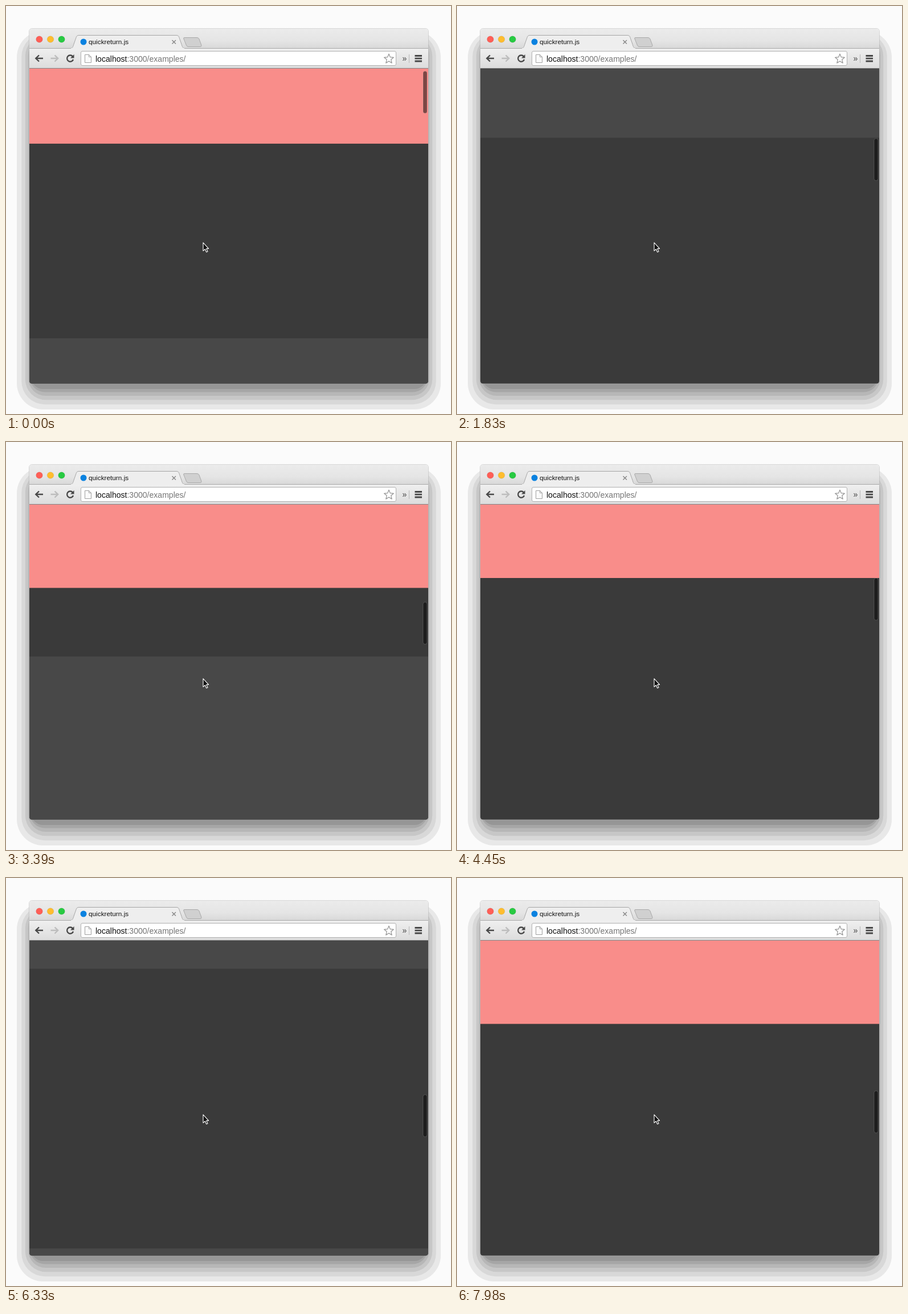
An HTML page that plays this animation: 781 px wide and 717 px high, repeating every 8 s.

```html
<!DOCTYPE html>
<html lang="en">
<head>
<meta charset="utf-8">
<title>Quick return header</title>
<style>
  html, body { margin: 0; width: 100%; height: 100%; overflow: hidden; background: #fbfbfb; }
  svg { display: block; width: 781px; height: 717px; }
  text { font-family: "Liberation Sans", Arial, sans-serif; }
</style>
</head>
<body>
<svg viewBox="0 0 781 717">
  <defs>
    <linearGradient id="strip" x2="0" y2="1">
      <stop offset="0" stop-color="#ebebeb"/><stop offset=".6" stop-color="#e5e5e5"/><stop offset="1" stop-color="#d8d8d8"/>
    </linearGradient>
    <linearGradient id="bar" x2="0" y2="1">
      <stop offset="0" stop-color="#efefef"/><stop offset="1" stop-color="#dcdcdc"/>
    </linearGradient>
    <clipPath id="window"><rect x="41" y="40" width="700" height="623.5" rx="4.5"/></clipPath>
    <clipPath id="page"><rect x="41" y="110" width="700" height="554"/></clipPath>
  </defs>

  <g id="shadow"></g>
  <rect x="40.5" y="39.5" width="701" height="624.5" rx="5" fill="none" stroke="#b5b5b5" stroke-opacity=".5"/>

  <g clip-path="url(#window)">
    <rect x="41" y="40" width="700" height="35" fill="url(#strip)"/>
    <rect x="41" y="75" width="700" height="35" fill="url(#bar)"/>
    <path d="M41 74.5H741" stroke="#a9a9a9"/>
    <path d="M113 74.5C117 74 117.500 72 119 67L123 55.500C124 52.500 125 51.500 128 51.500H299C302 51.500 303 52.500 304 55.500L308 67C309.500 72 310 74 314 74.500" fill="#eee" stroke="#a6a6a6"/>
    <path d="M114 74.500H313" stroke="#eee"/>
    <path d="M313 55.500H335Q338 55.500 339 58L343 69Q343.500 71.500 341 71.500H320Q317.500 71.500 316.500 69L312 58Q311 55.500 313 55.500Z" fill="#d0d0d0" stroke="#a9a9a9"/>

    <g stroke="#000" stroke-opacity=".1" stroke-width=".8">
      <circle cx="58.5" cy="58.5" r="5.8" fill="#ff5f57"/>
      <circle cx="78" cy="58.5" r="5.8" fill="#ffbd2e"/>
      <circle cx="97.5" cy="58.5" r="5.8" fill="#28ca42"/>
    </g>
    <circle cx="136" cy="63" r="5.5" fill="#0a82e0"/>
    <text x="145" y="67" font-size="11.8" fill="#111">quickreturn.js</text>
    <path d="M291.5 60L298 66.5M298 60L291.5 66.5" stroke="#858585" stroke-width="1.4"/>

    <g fill="none" stroke="#484848" stroke-width="2.4">
      <path d="M65 92H53M58 86.5L52.3 92L58 97.5"/>
      <path d="M78.5 92H90.5M85.5 86.5L91.2 92L85.5 97.5" stroke="#bdbdbd"/>
      <path d="M117 88.5A5.6 5.6 0 1 0 118 94"/>
      <path d="M119.5 85V91.5H113Z" fill="#484848" stroke="none"/>
      <path d="M717.5 87.5H730M717.5 92.2H730M717.5 97H730" stroke-width="2.8"/>
    </g>
    <rect x="131.5" y="79.5" width="553" height="25" rx="2.5" fill="#fff" stroke="#b0b0b0"/>
    <path d="M138.5 85.5H145.5L149.5 89.5V99.5H138.5ZM145.5 85.5V89.5H149.5" fill="#fafafa" stroke="#a0a0a0"/>
    <text x="157" y="97.5" font-size="14.05" fill="#111">localhost<tspan fill="#757575">:3000/examples/</tspan></text>
    <path id="star" fill="#fff" stroke="#939393" stroke-width="1.2" stroke-linejoin="round"/>
    <text x="695.5" y="96.5" font-size="14" fill="#444">»</text>
    <path d="M707.5 85V100" stroke="#b8b8b8"/>
    <path d="M41 109.5H741" stroke="#858585"/>

    <g clip-path="url(#page)">
      <rect x="41" y="110" width="700" height="554" fill="#3a3a3a"/>
      <g id="sections" fill="#484848"></g>
      <rect id="header" x="41" y="110" width="700" fill="#f98d8a"/>
      <rect id="thumb" x="732" width="7" height="74" rx="3.5" fill-opacity=".5" stroke="#fff" stroke-opacity=".17"/>
      <path d="M346 415.8V430.3L349.3 427.3L351.7 432.6L354 431.5L351.7 426.4H355.6Z" fill="#111" stroke="#fff" stroke-width="1.1" stroke-linejoin="round"/>
    </g>
  </g>
</svg>
<script>
const LOOP = 8000, TOP = 110, SECTION = 491.5, HEADER = 146.4, SCROLL_PER_THUMB_PX = 7.13;
const $ = id => document.getElementById(id);
const clamp = (value, max) => Math.max(0, Math.min(max, value));

function addRect(parent, attributes) {
  const rect = document.createElementNS(parent.namespaceURI, 'rect');
  for (const name in attributes) rect.setAttribute(name, attributes[name]);
  parent.append(rect);
}

// The window shadow falls off in flat bands
for (let i = 0; i < 6; i++) {
  const x = 19 + 9 * i - 0.8 * i * i, y = 44 + 4 * i, grey = 232 - 16.5 * i;
  addRect($('shadow'), {
    x, y, width: 782 - 2 * x, height: 709 - 9.2 * i + 0.4 * i * i - y,
    rx: 46 - 5 * i, fill: `rgb(${grey},${grey},${grey})`,
  });
}

for (let i = 1; i < 8; i += 2)
  addRect($('sections'), { x: 41, y: TOP + i * SECTION, width: 700, height: SECTION });

const starPoints = Array.from({ length: 10 }, (_, i) => {
  const r = i % 2 ? 3.9 : 8.8, a = i * Math.PI / 5;
  return `${672 + r * Math.sin(a)} ${93 - r * Math.cos(a)}`;
});
$('star').setAttribute('d', `M${starPoints.join('L')}Z`);

const START_SCROLL = 3.5;
const flicks = [
  { start: -103, duration: 1000, to: 483 },
  { start: 1220, duration: 910, to: 990 },
  { start: 2130, duration: 790, to: 1509 },
  { start: 2942, duration: 915, to: 889 },
  { start: 4349, duration: 849, to: 1326 },
  { start: 5198, duration: 890, to: 1868 },
  { start: 6180, duration: 650, to: 2222 },
  { start: 6863, duration: 1050, to: 1868 },
];
const ease = u => u * u * (3 - 2 * u);

// Scrolling down pushes the header out, scrolling up pulls it back in
function stateAt(t) {
  let scroll = START_SCROLL, header = HEADER;
  for (const { start, duration, to } of flicks) {
    const delta = (to - scroll) * ease(clamp((t - start) / duration, 1));
    if (t < start) break;
    scroll += delta;
    header = clamp(header - delta, HEADER);
  }
  return { scroll, header };
}

function draw(time) {
  const { scroll, header } = stateAt(time % LOOP);
  $('sections').setAttribute('transform', `translate(0 ${Math.round(SECTION - scroll) - SECTION})`);
  $('header').setAttribute('height', header);
  $('thumb').setAttribute('y', 112 + scroll / SCROLL_PER_THUMB_PX);
}

const startTime = performance.now();
function tick() {
  draw(performance.now() - startTime);
  requestAnimationFrame(tick);
}
tick();
</script>
</body>
</html>
```
